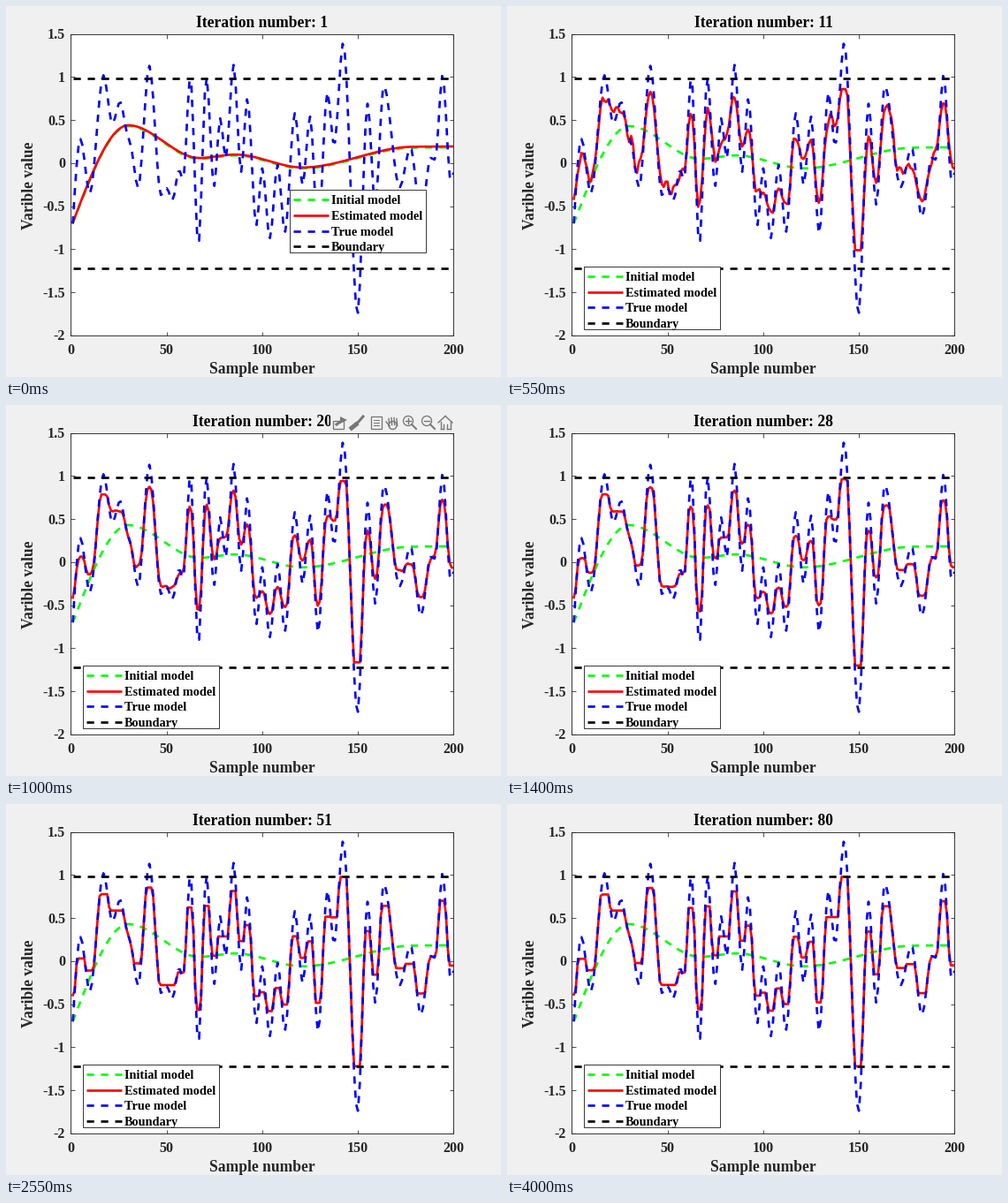
A matplotlib script that plays this animation: 560 px wide and 420 px high, repeating every 4.05 s.

```python
import numpy as np
import matplotlib.pyplot as plt
from matplotlib.animation import FuncAnimation
from matplotlib.patches import Circle, Rectangle

W, H = 560, 420
LEFT, RIGHT, TOP, BOTTOM = 73.4, 506.4, 31.6, 373
ITERATIONS = 80
INK, GRAY, PAPER = "#262626", "#777777", "#f0f0f0"
GREEN, RED, BLUE = "#00ff00", "#ff0000", "#0000ff"
LOW, HIGH = -1.22, 0.98
LW = 2.67
DASH = (0, (8.2 / LW, 7.8 / LW))

plt.rcParams["font.family"] = "Liberation Serif"
plt.rcParams["font.weight"] = "bold"


def smooth_curve(points, t):
    """Monotone cubic through the points, flat at every extremum."""
    x, y = np.array(points, float).T
    h = np.diff(x)
    d = np.diff(y) / h
    a, b = d[:-1], d[1:]
    same = a * b > 0
    inner = np.where(same, 2 * a * b / np.where(same, a + b, 1), 0)
    m = np.r_[1.5 * d[0], inner, 1.5 * d[-1]]
    i = np.clip(np.searchsorted(x, t, side="right") - 1, 0, len(h) - 1)
    s = (t - x[i]) / h[i]
    return (y[i] * (1 + 2 * s) * (1 - s) ** 2 + m[i] * h[i] * s * (1 - s) ** 2
            + y[i + 1] * s * s * (3 - 2 * s) + m[i + 1] * h[i] * s * s * (s - 1))


def wave(start, crests, end, t):
    """Curve through crests (x, height, next dip); dips lean to the lower crest."""
    points = [start]
    for (x, top, dip), (x2, top2, *_) in zip(crests, crests[1:] + [end]):
        points += [(x, top), ((x + x2) / 2 + (x2 - x) * (top - top2) / 8, dip)]
    return smooth_curve(points + [end], t)


def blur(values, sigma):
    i = np.arange(len(values))
    w = np.exp(-0.5 * ((i[:, None] - i) / sigma) ** 2)
    return w @ values / w.sum(axis=1)


def tv_denoise(signal, weights, steps=600):
    """Total variation denoising, one row per weight."""
    lam = weights[:, None]

    def primal(z):
        return signal + np.diff(z, axis=1, prepend=0, append=0)

    z = v = np.zeros((len(weights), len(signal) - 1))
    t = 1.0
    for _ in range(steps):
        z_new = np.clip(v + 0.25 * np.diff(primal(v), axis=1), -lam, lam)
        t_new = (1 + np.sqrt(1 + 4 * t * t)) / 2
        v = z_new + (t - 1) / t_new * (z_new - z)
        z, t = z_new, t_new
    return primal(z)


n = np.arange(1, 201)
true_model = wave((1, -.7), [
    (5, .28, -.35), (17, 1.02, .46), (25.7, .71, .38), (31.5, .18, -.28),
    (41, 1.13, -.37), (50, -.29, -.43), (56.5, -.08, -.19), (62.4, 1, -.95),
    (70.8, 1, -.27), (78, .52, .06), (85, 1.14, -.1), (92.2, .75, -.72),
    (100, -.06, -.87), (108, -.02, -.8), (117, .58, -.25), (125, .54, -.82),
    (134, .82, .21), (142.3, 1.4, -1.75), (155, .69, -.48), (163.5, .9, -.28),
    (177.5, .18, -.62), (188, .06, .04), (194.2, 1.02, -.2)], (201, 0), n)
initial_model = smooth_curve([
    (1, -.7), (30, .43), (67, .05), (86, .09), (121, -.06), (178, .18), (202, .185)], n)


def estimate_all():
    late = np.maximum(np.arange(ITERATIONS) - 10, 0)
    rough = np.repeat(np.random.default_rng(4).normal(0, 1, 100), 2)
    rows = tv_denoise(true_model, 0.315 - 0.09 * np.exp(-late / 18))
    for i, age in enumerate(late):
        row = blur(rows[i], 0.15 + 0.95 * np.exp(-age / 18))
        row = row + 0.045 * np.exp(-age / 5) * rough
        row = np.clip(row, LOW + 0.17 * np.exp(-age / 8), HIGH - 0.09 * np.exp(-age / 10))
        mix = 1 - np.exp(-i / 3)
        rows[i] = mix * row + (1 - mix) * (initial_model + 0.01)
    return rows


estimates = estimate_all()

fig = plt.figure(figsize=(W / 72, H / 72), dpi=72, facecolor=PAPER)
ax = fig.add_axes([LEFT / W, 1 - BOTTOM / H, (RIGHT - LEFT) / W, (BOTTOM - TOP) / H])
ax.set(xlim=(0, 200), ylim=(-2, 1.5), xticks=range(0, 201, 50),
       yticks=np.arange(-2, 1.6, 0.5))
ax.tick_params(direction="in", top=True, right=True, length=4.5, width=0.8,
               color=INK, labelbottom=False, labelleft=False)
for spine in ax.spines.values():
    spine.set(linewidth=0.9, color=INK)

dashed = dict(lw=LW, ls=DASH, dash_capstyle="butt")
ax.plot(n, initial_model, color=GREEN, **dashed)
est_line, = ax.plot(n, estimates[0], color=RED, lw=LW)
ax.plot(n, true_model, color=BLUE, **dashed)
for level in (HIGH, LOW):
    ax.plot([1, 200], [level] * 2, color="black", **dashed)

# Overlay in pixel coordinates for text, legend and toolbar
page = fig.add_axes([0, 0, 1, 1], zorder=5)
page.set(xlim=(0, W), ylim=(H, 0))
page.axis("off")


def label(x, y, text, size, color=INK, ha="center", va="baseline", **kw):
    return page.text(x, y, text, fontsize=size, color=color, ha=ha, va=va, **kw)


for v in range(0, 201, 50):
    label(LEFT + v * (RIGHT - LEFT) / 200, 394, str(v), 16)
for v in np.arange(-2, 1.6, 0.5):
    label(67, TOP + (1.5 - v) * (BOTTOM - TOP) / 3.5 + 5.5, f"{v:g}", 16, ha="right")
label(290, 416, "Sample number", 17.5)
label(27, 203, "Varible value", 17.5, va="center", rotation=90)
title = label(290, 24, "", 17.5, "black")


def make_legend(x, y):
    parts = [page.add_patch(Rectangle((x, y), 154, 71, fc="white", ec=INK, lw=0.9))]
    rows = [("Initial model", GREEN, DASH), ("Estimated model", RED, "-"),
            ("True model", BLUE, DASH), ("Boundary", "black", DASH)]
    for i, (name, color, style) in enumerate(rows):
        row = y + 10.7 + 17.7 * i
        parts += page.plot([x + 4, x + 44], [row, row], color=color, lw=LW, ls=style,
                           dash_capstyle="butt", solid_capstyle="butt")
        parts.append(label(x + 47, row + 5, name, 14.3, "black", ha="left"))
    return parts


def make_toolbar():
    parts = []

    def add(patch):
        parts.append(page.add_patch(patch))

    def outline(x, y, w, h):
        add(Rectangle((x, y), w, h, fill=False, ec=GRAY, lw=1.3, zorder=7))

    def stroke(x, y, dx, dy, lw=1.4):
        parts.extend(page.plot([x, x + dx], [y, y + dy], color=GRAY, lw=lw, zorder=7))

    add(Rectangle((367, 10), 141, 20, fc=PAPER, lw=0, zorder=6))
    # Export
    outline(370, 18, 12, 9)
    stroke(374, 22, 7, -5, 3)
    parts.extend(page.plot(382, 17, ">", color=GRAY, ms=8, mew=0, zorder=8))
    # Brush
    stroke(404, 13, -7, 8, 3)
    stroke(396, 22, -5, 4, 5)
    # Data tip
    outline(413, 13, 12, 14)
    for y in (17, 20, 23):
        stroke(416, y, 6, 0, 1)
    # Hand
    for i in range(4):
        stroke(433 + 3 * i, 14 + abs(i - 1.5), 0.6, 8)
    stroke(430, 19, 4, 5)
    add(Circle((437.5, 23), 4.5, fill=False, ec=GRAY, lw=1.4, zorder=7))
    # Zoom in and out
    for x in (455, 476):
        add(Circle((x, 18), 5.5, fill=False, ec=GRAY, lw=1.3, zorder=7))
        stroke(x + 4, 22, 5, 5, 2)
        stroke(x - 3, 18, 6, 0)
    stroke(455, 15, 0, 6)
    # Home
    for side in (-1, 1):
        stroke(497, 12.5, 8 * side, 7.5)
        stroke(497 + 5.5 * side, 19, 0, 8)
        stroke(497 + 2 * side, 22, 0, 5)
        stroke(497 + 2 * side, 27, 3.5 * side, 0)
    return parts


first_legend = make_legend(321, 208.4)
legend = make_legend(87, 295.4)
toolbar = make_toolbar()


def show(parts, on):
    for p in parts:
        p.set_visible(on)


def update(i):
    k = max(1, i)
    title.set_text(f"Iteration number: {k}")
    est_line.set_ydata(estimates[k - 1])
    show(first_legend, k == 1)
    show(legend, k > 1)
    show(toolbar, k == 20)
    return []


anim = FuncAnimation(fig, update, frames=ITERATIONS + 1, interval=50,
                     repeat=True, repeat_delay=0)
plt.show()
```
